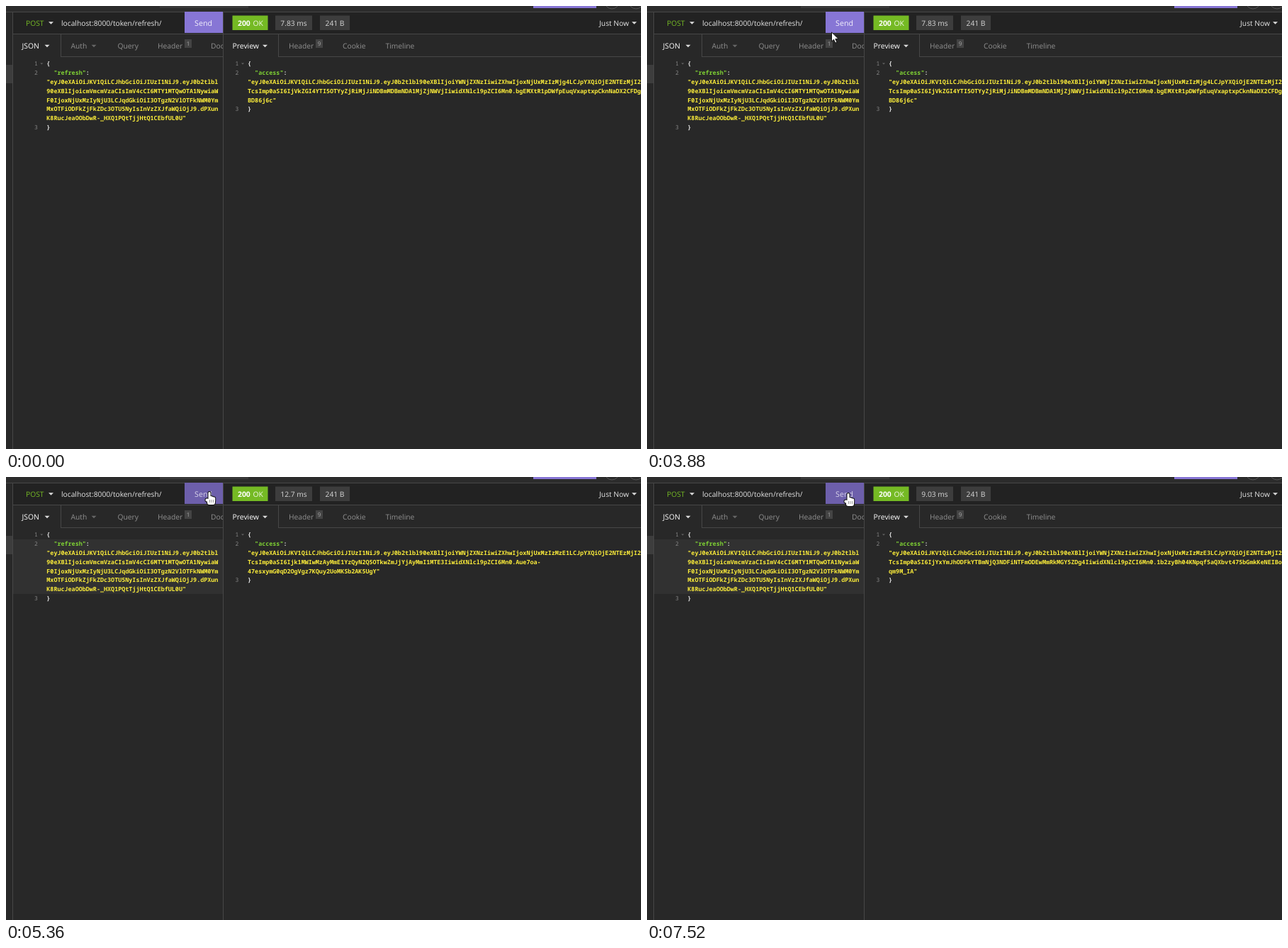
Write an HTML page with a canvas that moves like this. It is 896 by 625 pixels and loops after 8 s.

```html
<!DOCTYPE html>
<html lang="en">
<head>
<meta charset="utf-8">
<title>Token refresh</title>
<style>
html, body { margin: 0; width: 100%; height: 100%; overflow: hidden; background: #282828; }
canvas { display: block; }
</style>
</head>
<body>
<canvas id="stage" width="896" height="625"></canvas>
<script>
const ctx = document.getElementById('stage').getContext('2d');
const LOOP = 8000;
const UI = '"Open Sans", "Noto Sans", sans-serif';
const MONO = '"Noto Sans Mono", "DejaVu Sans Mono", monospace';
const BG = '#282828', LINE = '#474747', CHIP = '#3d3d3d';
const LIGHT = '#e6e6e6', MUTED = '#909090', GREEN = '#75ba24', YELLOW = '#fbec3a', PURPLE = '#8776d5';
const MID = 24, TAB = 60, CHAR = 5.05, ROW = 12.8;

const HEAD = '"eyJ0eXAiOiJKV1QiLCJhbGciOiJIUzI1NiJ9.eyJ0b2tlbl';
const REQUEST = [
  HEAD,
  '90eXBlIjoicmVmcmVzaCIsImV4cCI6MTY1MTQwOTA1NywiaW',
  'F0IjoxNjUxMzIyNjU3LCJqdGkiOiI3OTgzN2VlOTFkNWM0Ym',
  'MxOTFiODFkZjFkZDc3OTU5NyIsInVzZXJfaWQiOjJ9.dPXun',
  'K8RucJeaOObDwR-_HXQ1PQtTjjHtQ1CEbfUL0U"'
];
const access = (stamp, ...rest) =>
  [HEAD + '90eXBlIjoiYWNjZXNzIiwiZXhwIjoxNjUxMzIz' + stamp + 'LCJpYXQiOjE2NTEzMjI2', ...rest];
const RESPONSES = [
  { from: 0, time: '7.83 ms', token: access('Mjg4',
    'TcsImp0aSI6IjVkZGI4YTI5OTYyZjRiMjJiNDBmMDBmNDA1MjZjNWVjIiwidXNlcl9pZCI6Mn0.bgEMXtR1pDWfpEuqVxaptxpCknNaDX2CFDg',
    'BD86j6c"') },
  { from: 5360, time: '12.7 ms', token: access('MzE1',
    'TcsImp0aSI6Ijk1MWIwMzAyMmE1YzQyN2Q5OTkwZmJjYjAyMmI1MTE3IiwidXNlcl9pZCI6Mn0.Aue7oa-',
    '47esxymG0qD2OgVgz7KQuy2UoMKSb2AK5UgY"') },
  { from: 7320, time: '9.03 ms', token: access('MzE3',
    'TcsImp0aSI6IjYxYmJhODFkYTBmNjQ3NDFiNTFmODEwMmRkMGY5ZDg4IiwidXNlcl9pZCI6Mn0.1b2zyBh04KNpqf5aQXbvt475bGmkKeNEIBo',
    'qm9M_IA"') }
];
const LOAD_TIME = 490;
const FOCUS = 4830, BLINK = 530;

// Pointer stops, joined by eased moves
const STOPS = [
  { t: 1010, x: 797, y: 600 },
  { t: 1780, x: 228, y: 90 },
  { t: 2300, x: 634, y: 120 },
  { t: 3050, x: 322, y: 115 },
  { t: 3862, x: 261, y: 38 },
  { t: 4410, x: 287, y: 21 },
  { t: 5560, x: 287, y: 21 },
  { t: 6550, x: 284, y: 23 }
];

function rect(x, y, w, h, color) {
  ctx.fillStyle = color;
  ctx.fillRect(x, y, w, h);
}

function text(s, x, y, color, { size = 10.25, align = 'left', weight = 400, family = UI } = {}) {
  ctx.font = `${weight} ${size}px ${family}`;
  ctx.textAlign = align;
  ctx.fillStyle = color;
  ctx.fillText(s, x, y);
}

const code = (s, x, y, color) => text(s, x, y, color, { size: 8.42, weight: 600, family: MONO });
const title = (s, x) => text(s, x, TAB, '#fff', { size: 10.4, weight: 500 });
const tab = (s, x) => text(s, x, TAB, MUTED);

function shape(points, fill, stroke) {
  ctx.beginPath();
  points.forEach(([x, y]) => ctx.lineTo(x, y));
  ctx.closePath();
  ctx.fillStyle = fill;
  ctx.fill();
  if (stroke) {
    ctx.strokeStyle = stroke;
    ctx.lineWidth = 1;
    ctx.stroke();
  }
}

const arrow = (x, y, color = '#ddd', r = 3.5) =>
  shape([[x - r, y - r / 2], [x + r, y - r / 2], [x, y + r / 2]], color);

function badge(x, label) {
  rect(x, 47, 10, 12, '#444');
  text(label, x + 5, 56, '#aaa', { size: 8, align: 'center' });
}

function chip(x, w, label) {
  rect(x, 13.5, w, 20.5, CHIP);
  text(label, x + w / 2, 28, '#d8d8d8', { align: 'center' });
}

function circle(x, y, r) {
  ctx.beginPath();
  ctx.arc(x, y, r, 0, Math.PI * 2);
  ctx.strokeStyle = '#555';
  ctx.lineWidth = 1;
  ctx.stroke();
}

function editor(x, key, lines) {
  const row = i => 84.4 + ROW * i;
  const last = lines.length + 2;
  [0, 1, last].forEach((r, i) =>
    text(i + 1, x - 15, row(r), '#858585', { size: 8, align: 'center', family: MONO }));
  arrow(x - 7, 81.5, '#666', 2);
  code('{', x, row(0), LIGHT);
  code(`"${key}"`, x + 2 * CHAR, row(1), '#7ed034');
  code(':', x + (key.length + 4) * CHAR, row(1), LIGHT);
  lines.forEach((s, i) => code(s, x, row(i + 2), YELLOW));
  code('}', x, row(last), LIGHT);
}

function shell() {
  rect(0, 0, 896, 625, BG);
  rect(0, 0, 896, 8, '#2c2c2c');
  rect(217, 0, 125, 3, '#3a3a3a');
  rect(744, 0, 89, 3, PURPLE);
  circle(855, -6, 10);
  circle(889, -6, 10);
  rect(0, 83, 9, 26, CHIP);
  rect(10, 9, 886, 30, '#222');
  rect(0, 8, 896, 1, LINE);
  rect(9, 9, 1, 616, LINE);
  rect(10, 39, 886, 1, LINE);
}

// Edge of the active tab and the rule to its right
function tabEdge(x, right) {
  rect(x, 40, 1, 31, LINE);
  rect(x, 71, right - x, 1, LINE);
}

function requestPane(t, hover) {
  text('POST', 28, 28, GREEN);
  arrow(63.5, MID);
  text('localhost:8000/token/refresh/', 78, 27.5, LIGHT);
  rect(252, 8, 54, 30, hover ? '#6d5fab' : PURPLE);
  text('Send', 278.5, 28, hover ? '#d9d5ea' : '#f4f2fc', { size: 10.6, align: 'center' });

  tabEdge(77, 306);
  title('JSON', 22.5);
  arrow(58, 56.5);
  tab('Auth', 91.5);
  arrow(124, 56.5, '#666');
  tab('Query', 157.5);
  tab('Header', 214);
  badge(252, '1');
  tab('Docs', 289);
  rect(307, 40, 12, 31, BG);

  if (t >= FOCUS) rect(10, 88, 296, 77, '#313131');
  editor(57.3, 'refresh', REQUEST);
  if (t >= FOCUS && Math.floor((t - FOCUS) / BLINK) % 2 === 0) rect(249, 152, 1, 13, '#ccc');
}

function responsePane(t) {
  const res = RESPONSES.findLast(r => t >= r.from);
  rect(319.5, 13.5, 50, 20.5, GREEN);
  text('200', 327, 28, '#fff', { size: 10.4, weight: 700 });
  text('OK', 348.5, 28, '#f2f8e9');
  chip(380, 52, res.time);
  chip(443, 42, '241 B');
  text('Just Now', 879, 27.5, LIGHT, { align: 'right' });
  arrow(886.5, MID);

  tabEdge(384, 896);
  title('Preview', 319.5);
  arrow(365.5, 56.5);
  tab('Header', 399);
  badge(437, '9');
  tab('Cookie', 475);
  tab('Timeline', 535.5);
  editor(341, 'access', res.token);
}

function spinner(angle) {
  ctx.save();
  ctx.translate(606.5, 398);
  ctx.rotate(angle);
  ctx.strokeStyle = LIGHT;
  ctx.lineWidth = 5;
  for (let i = 0; i < 2; i++) {
    ctx.beginPath();
    ctx.arc(0, 0, 16, Math.PI * 1.07, Math.PI * 1.8);
    ctx.stroke();
    shape([[19.5, -18], [19.5, -4], [5.5, -4]], LIGHT);
    ctx.rotate(Math.PI);
  }
  ctx.restore();
}

// A request runs just before each new response arrives
function loading(t) {
  const next = RESPONSES.find(r => r.from > t);
  const age = next ? t - next.from + LOAD_TIME : -1;
  if (age < 0) return;
  ctx.globalAlpha = Math.min(1, (age + 30) / 150);
  rect(307, 9, 589, 616, 'rgba(29,29,29,0.8)');
  text('Loading...', 606.5, 351, LIGHT, { size: 16.2, align: 'center' });
  spinner((age - 140) / 2000 * Math.PI * 2);
  ctx.beginPath();
  ctx.roundRect(556.5, 445.5, 100, 26, 2.5);
  ctx.strokeStyle = '#8a8a8a';
  ctx.lineWidth = 1;
  ctx.stroke();
  text('Cancel Request', 606.5, 462, LIGHT, { size: 10.35, align: 'center' });
  ctx.globalAlpha = 1;
}

// The pointer is sampled about every 70 ms
function pointer(t) {
  const first = STOPS[0], step = 69.57;
  if (t < first.t) return null;
  const s = first.t + Math.floor((t - first.t) / step + 0.2) * step;
  const i = STOPS.findIndex(p => p.t > s);
  if (i < 0) return STOPS.at(-1);
  const a = STOPS[i - 1], b = STOPS[i];
  const k = (1 - Math.cos((s - a.t) / (b.t - a.t) * Math.PI)) / 2;
  return { x: Math.round(a.x + (b.x - a.x) * k), y: Math.round(a.y + (b.y - a.y) * k) };
}

function hand() {
  const parts = new Path2D();
  parts.roundRect(-1.5, 0, 3, 13, 1.5);
  for (let i = 0; i < 3; i++) parts.roundRect(1 + 2.2 * i, 6 + 0.7 * i, 2.8, 7, 1.3);
  parts.roundRect(-5.5, 9.5, 4.5, 4, 1.8);
  parts.roundRect(-3, 10, 11, 8, 3);
  ctx.strokeStyle = '#111';
  ctx.lineWidth = 2;
  ctx.stroke(parts);
  ctx.fillStyle = '#fff';
  ctx.fill(parts);
  for (let i = 0; i < 3; i++) rect(0.2 + 2.4 * i, 11, 0.7, 4, '#666');
}

function beam() {
  rect(-0.5, -6, 1, 13, '#d8d8d8');
  for (const y of [-7, 7]) {
    rect(-3, y, 2.5, 1, '#d8d8d8');
    rect(0.5, y, 2.5, 1, '#d8d8d8');
  }
}

const cursor = () =>
  shape([[-0.5, -1], [-0.5, 12], [2.5, 9.3], [4.8, 14.2], [7, 13.2], [4.8, 8.5], [9, 8.3]], '#fff', '#111');

function drawPointer({ x, y }, hover) {
  ctx.save();
  ctx.translate(x, y);
  if (hover) hand();
  else if (y > 72) beam();
  else cursor();
  ctx.restore();
}

function draw(t) {
  const p = pointer(t);
  const hover = !!p && p.x >= 252 && p.x < 306 && p.y >= 8 && p.y < 38;
  ctx.textRendering = 'geometricPrecision';
  shell();
  requestPane(t, hover);
  responsePane(t);
  loading(t);
  rect(306, 9, 1, 616, LINE);
  if (p) drawPointer(p, hover);
}

const start = performance.now();
function tick() {
  draw((performance.now() - start) % LOOP);
  requestAnimationFrame(tick);
}
tick();
</script>
</body>
</html>
```
